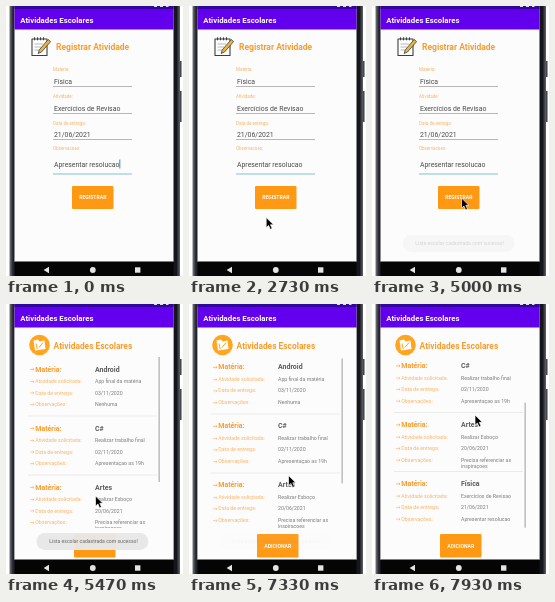
An HTML page that plays this animation: 177 by 270 pixels, repeating every 8 s.

```html
<!DOCTYPE html>
<html lang="pt">
<head>
<meta charset="utf-8">
<style>
  html, body { margin: 0; width: 100%; height: 100%; overflow: hidden; background: #fff; }
  svg { display: block; width: 177px; height: 270px; font-family: Roboto, sans-serif; }
</style>
</head>
<body>
<svg viewBox="0 0 177 270">
  <defs>
    <clipPath id="screen"><rect x="8.5" y="23.5" width="159" height="232"/></clipPath>
    <clipPath id="viewport"><rect x="8.5" y="53" width="159" height="171"/></clipPath>
    <linearGradient id="bezel">
      <stop offset="0" stop-color="#77797f"/>
      <stop offset=".02" stop-color="#23242b"/>
      <stop offset=".98" stop-color="#15161b"/>
      <stop offset="1" stop-color="#63656c"/>
    </linearGradient>
  </defs>
  <rect x="3.5" y="-20" width="170.5" height="310" fill="url(#bezel)"/>
  <path d="M174.8 55V71M174.8 85V116" stroke="#33343c" stroke-width="1.4"/>
  <rect x="8.5" width="159" height="256" fill="#fcfcfc"/>
  <g clip-path="url(#screen)">
    <g id="form">
      <g stroke="#3d3d3d" stroke-linejoin="round">
        <path d="M26 33H41V49.5H26Z" fill="#fff" stroke-width="1.1"/>
        <path d="M28.5 31.3v3M31.5 31.3v3M34.5 31.3v3M37.5 31.3v3" stroke-width="1"/>
        <path d="M28.5 38H37M28.5 41H35M28.5 44H33" stroke="#999" stroke-width=".7"/>
        <path d="M42.2 33.5L44.6 35.6L35.5 46L32.2 47.5L33.2 44Z" fill="#eeb43e" stroke-width=".8"/>
      </g>
      <rect x="66" y="180" width="41.5" height="23" rx="1" fill="#ff9914"/>
      <rect id="ripple" x="66" y="180" width="41.5" height="23" rx="1" fill="#fff"/>
    </g>
    <g id="list">
      <rect x="8.5" y="23.5" width="159" height="250" fill="#fcfcfc"/>
      <circle cx="33.5" cy="41" r="10.3" fill="#ffa51f"/>
      <path d="M27.5 36.5L32 35.5L33.5 37.5L38.5 36.5L39.5 45L29 46.5Z" fill="#fff"/>
      <path d="M30 39.5L31.2 45M33 43.5L37 38.5" stroke="#ffa51f" stroke-width="1"/>
      <g clip-path="url(#viewport)"><g id="items"></g></g>
      <rect id="thumb" x="152.5" width="1.3" height="125" fill="#b2b2b2"/>
      <rect x="68" y="230" width="41.5" height="23.5" rx="1" fill="#ff9914"/>
    </g>
  </g>
  <rect x="8.5" width="159" height="23.5" fill="#6200ee"/>
  <rect x="8.5" width="159" height="3" fill="#3205a0"/>
  <path d="M148 .5h3M154 .5h3M160 .5h2.5" stroke="#ddd"/>
  <rect x="8.5" y="255.5" width="159" height="15" fill="#050505"/>
  <path d="M43 260.8V267.2L37.6 264Z" fill="#e4e4e4"/>
  <circle cx="86.8" cy="264" r="2.9" fill="#e4e4e4"/>
  <rect x="129" y="261.3" width="5.4" height="5.4" fill="#e4e4e4"/>
  <g id="toast"><rect x="30.5" y="229" width="112" height="17" rx="8.5" fill="#e8e8e8" fill-opacity=".96"/></g>
  <path id="pointer" d="M0 0V10.2L2.4 8L4.1 11.9L6 11L4.3 7.3H7.4Z" fill="#000" stroke="#fff" stroke-width=".7"/>
</svg>
<script>
const $ = id => document.getElementById(id);
const ORANGE = '#fb9b2c', LABEL = '#fbb266', DARK = '#4a4a4a', GREY = '#7c7c7c';

function add(parent, tag, attrs, content = '') {
  const el = document.createElementNS('http://www.w3.org/2000/svg', tag);
  for (const key in attrs) el.setAttribute(key, attrs[key]);
  el.textContent = content;
  parent.append(el);
  return el;
}
const text = (parent, x, y, size, fill, content, weight = 400, anchor = 'start') =>
  add(parent, 'text', { x, y, fill, 'font-size': size, 'font-weight': weight, 'text-anchor': anchor }, content);
const line = (parent, x1, x2, y, stroke) =>
  add(parent, 'path', { d: `M${x1} ${y}H${x2}`, stroke, 'stroke-width': .7 });

const svg = document.querySelector('svg');
const form = $('form'), list = $('list'), items = $('items'), toast = $('toast');
text(svg, 14.3, 17, 7.8, '#fff', 'Atividades Escolares', 700);
text(form, 50, 44, 8.5, ORANGE, 'Registrar Atividade', 700);
[['Materia:', 'Física', 65, 77.5, 80.5],
 ['Atividade:', 'Exercícios de Revisao', 92, 104.5, 107.5],
 ['Data de entrega:', '21/06/2021', 118.5, 130.5, 133.5],
 ['Observacoes:', 'Apresentar resolucao', 144, 160.5, 168]
].forEach(([label, value, labelY, valueY, lineY], i) => {
  text(form, 47, labelY, 4.5, LABEL, label);
  text(form, 48, valueY, 6.9, DARK, value);
  line(form, 47, 126, lineY, i < 3 ? '#999' : '#4fa9bd');
});
const caret = add(form, 'rect', { x: 113.3, y: 153.5, width: 1, height: 9, fill: '#1c9db5' });
text(form, 86.8, 193.3, 5.1, '#fff', 'REGISTRAR', 700, 'middle');

text(list, 47.6, 44.8, 8.4, ORANGE, 'Atividades Escolares', 700);
text(list, 88.8, 243.7, 5.1, '#fff', 'ADICIONAR', 700, 'middle');
[['Android', 'App final da matéria', '03/11/2020', 'Nenhuma'],
 ['C#', 'Realizar trabalho final', '02/11/2020', 'Apresentaçao as 19h'],
 ['Artes', 'Realizar Esboço', '20/06/2021', 'Precisa referenciar as', 'inspiraçoes'],
 ['Física', 'Exercicios de Revisao', '21/06/2021', 'Apresentar resolucao']
].forEach((values, i) => {
  const y = 67.5 + 59 * i;
  const labels = ['Matéria:', 'Atividade solicitada:', 'Data de entrega:', 'Observações:'];
  values.forEach((value, row) => {
    const rowY = y + [0, 11.7, 23, 34.7, 40.5][row];
    const size = row ? 5.2 : 7, weight = row ? 400 : 700;
    const color = row ? LABEL : ORANGE;
    if (labels[row]) {
      const arrow = rowY - size * .3;
      add(items, 'path', { d: `M24 ${arrow}h4m-1.3 -1.2l1.3 1.2l-1.3 1.2`, fill: 'none', stroke: color, 'stroke-width': .6 });
      text(items, 29.3, rowY, size, color, labels[row], weight);
    }
    text(items, 89, rowY, size, row ? GREY : '#5c5c5c', value, weight);
  });
  if (i < 3) line(items, 22, 151, y + 44.5, '#e2e2e2');
});
text(toast, 87.5, 239.2, 5.1, '#666', 'Lista escolar cadastrada com sucesso!', 400, 'middle');
svg.append($('pointer'));

// Pointer stops: time, x, y
const path = [
  [1250, 162, 270], [1500, 105, 230], [1800, 46, 197], [2070, 37, 199], [2450, 52, 222],
  [2930, 95, 204], [3330, 91, 196], [3600, 89.5, 192], [6130, 89.5, 192], [6600, 101.5, 163],
  [6950, 100, 173.5], [7300, 99.5, 173.5], [7600, 99.5, 154], [7930, 103, 111], [8000, 103, 111]
];
const ramp = (t, from, to) => Math.min(1, Math.max(0, (t - from) / (to - from)));
const ease = p => 1 - (1 - p) ** 2;

function pointerAt(t) {
  const i = Math.max(1, path.findIndex(stop => stop[0] > t));
  const [t0, x0, y0] = path[i - 1], [t1, x1, y1] = path[i];
  const p = ramp(t, t0, t1);
  return [x0 + (x1 - x0) * p, y0 + (y1 - y0) * p];
}

function draw(t) {
  const [x, y] = pointerAt(t);
  const scroll = t > 7300 ? 173.5 - y : 0;
  const open = ease(ramp(t, 5060, 5450));
  $('pointer').setAttribute('transform', `translate(${x} ${y})`);
  $('pointer').setAttribute('opacity', t < 1250 ? 0 : 1);
  caret.setAttribute('opacity', t % 1000 < 470 && t < 4470 ? 1 : 0);
  $('ripple').setAttribute('opacity', .25 * ramp(t, 3960, 4070) * (1 - ramp(t, 4130, 4300)));
  list.setAttribute('opacity', open);
  list.setAttribute('transform', `translate(0 ${16 * (1 - open)})`);
  items.setAttribute('transform', `translate(0 ${-scroll})`);
  $('thumb').setAttribute('y', 53 + scroll * 171 / 234);
  toast.setAttribute('opacity', ramp(t, 4920, 5220) * (1 - ramp(t, 7000, 7350)));
}

const start = performance.now();
(function tick() {
  draw((performance.now() - start) % 8000);
  requestAnimationFrame(tick);
})();
</script>
</body>
</html>
```
